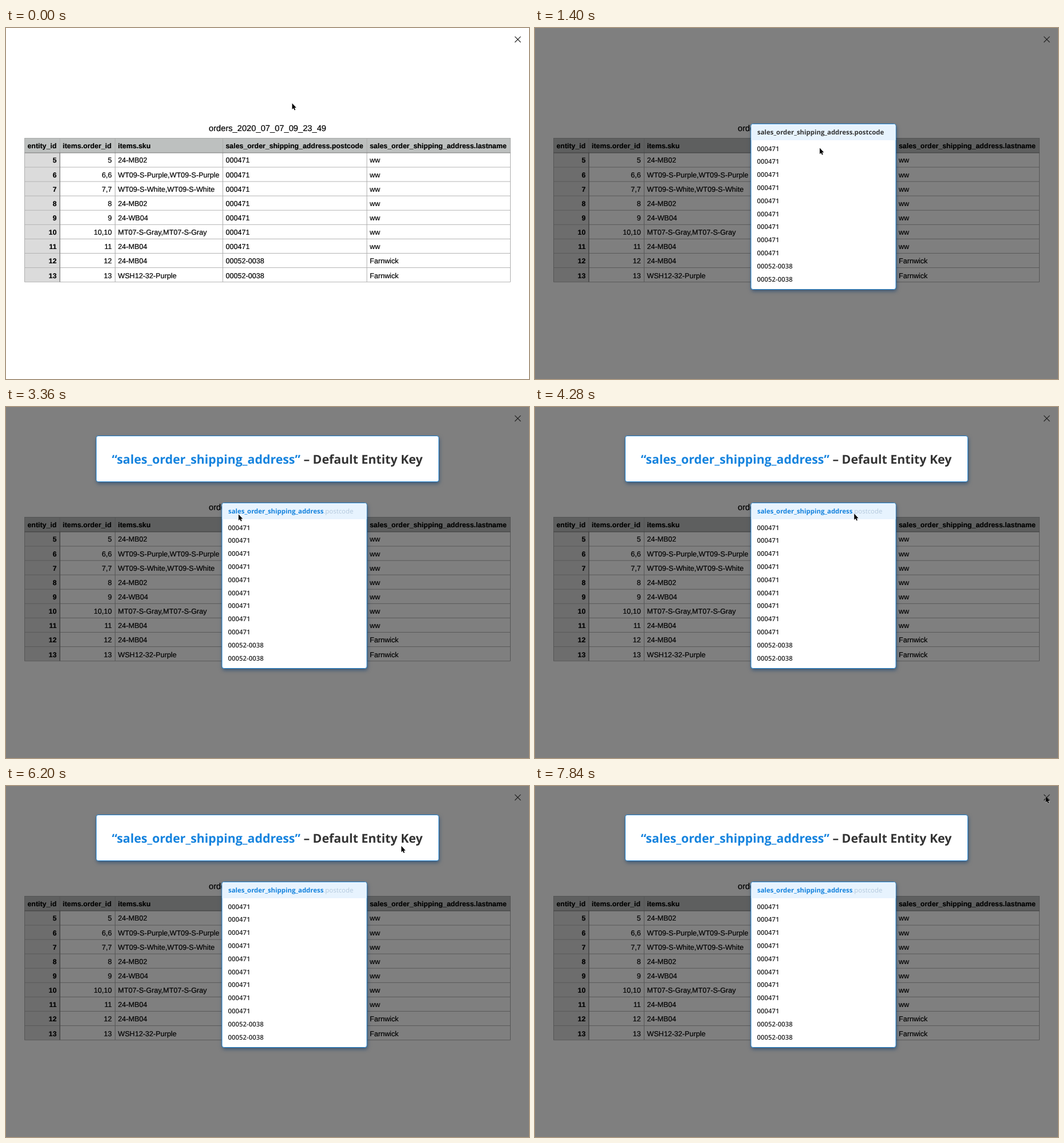
An HTML page for the animation above (8 s loop, 913 px wide and 613 px high).

```html
<!DOCTYPE html>
<html lang="en">
<head>
<meta charset="utf-8">
<title>Order export table</title>
<style>
  html, body { margin: 0; width: 100%; height: 100%; overflow: hidden; background: #fff; }
  svg { display: block; width: 913px; height: 613px; }
  text { text-rendering: geometricPrecision; white-space: pre; }
  #table { font: 12.6px "Liberation Sans", Arial, sans-serif; }
  #table text { stroke: #000; stroke-width: .2px; }
  #table .head { font-weight: bold; font-size: 12.35px; }
  #table .title { font-size: 14.7px; }
  #popup { font: 600 11.4px "Open Sans", sans-serif; fill: #222; }
  .bold { font-weight: 700; fill: #333; }
  .key { fill: #1583de; font-weight: 700; }
  .rest { fill: #b3c8dc; font-weight: 400; }
  .card { fill: #fff; stroke: #1c7fcd; filter: drop-shadow(1px 3px 3px rgba(0, 50, 105, .5)); }
</style>
</head>
<body>
<svg viewBox="0 0 913 613">
  <g id="table"></g>
  <g id="popup">
    <rect width="913" height="613" fill="#000" opacity=".5"/>
    <rect class="card" x="377" y="167.5" width="253" height="289" rx="3.5"/>
    <path d="M377.5 196V171q0-3 3-3H626.500q3 0 3 3V196z" fill="#e7f3fe"/>
    <text id="plain" class="bold" x="388" y="186">sales_order_shipping_address.postcode</text>
    <g id="banner">
      <text x="388" y="186"><tspan class="key">sales_order_shipping_address</tspan><tspan class="rest">.postcode</tspan></text>
      <rect class="card" x="157.500" y="50.500" width="598" height="80" rx="3.5"/>
      <text class="bold" x="456" y="98.500" font-size="21.3" text-anchor="middle"><tspan class="key">“sales_order_shipping_address”</tspan> – Default Entity Key</text>
    </g>
  </g>
  <path d="M888.300 14.800l10.200 10.200m0-10.200l-10.200 10.200" stroke="#222" stroke-width="1.1"/>
  <path id="cursor" d="M0-.6V10L2.400 7.900 4 11.600 5.700 10.900 4.200 7.300H7.300z" stroke="#fff" stroke-width=".8" paint-order="stroke"/>
</svg>
<script>
const $ = id => document.getElementById(id);
const table = $("table"), popup = $("popup"), banner = $("banner"), plain = $("plain"), cursor = $("cursor");

function add(parent, tag, attrs, content = "") {
  const el = document.createElementNS("http://www.w3.org/2000/svg", tag);
  for (const k in attrs) el.setAttribute(k, attrs[k]);
  el.textContent = content;
  parent.append(el);
}

// Table
const cols = [32.5, 94, 190.5, 378.5, 630, 880.5];
const top0 = 192, body0 = 218, rowH = 25.07, bottom = body0 + 9 * rowH;
const codes = ["000471", "00052-0038"];
const skus = ["24-MB02", "WT09-S-Purple,WT09-S-Purple", "WT09-S-White,WT09-S-White", "24-MB02",
  "24-WB04", "MT07-S-Gray,MT07-S-Gray", "24-MB04", "24-MB04", "WSH12-32-Purple"];

const fill = (x, y, w, h, color) => add(table, "rect", { x, y, width: w, height: h, fill: color });
const line = (d, color) => add(table, "path", { d, stroke: color, fill: "none" });
function cell(col, y, str, bold, right) {
  add(table, "text", {
    x: right ? cols[col + 1] - 5.7 : cols[col] + 5, y,
    class: bold ? "head" : "", "text-anchor": right ? "end" : "start"
  }, str);
}

fill(cols[0], body0, cols[1] - cols[0], bottom - body0, "#dbdbdb");
fill(cols[0], top0, cols[5] - cols[0], body0 - top0, "#bdc0bf");
for (let i = 1; i <= 9; i++) line(`M${cols[0]} ${body0 + i * rowH}H${cols[5]}`, "#b5b5b5");
for (const x of cols) line(`M${x} ${top0}V${bottom}`, "#adadad");
line(`M${cols[0]} ${top0 + .5}H${cols[5]}`, "#a8aaa9");
line(`M${cols[0]} ${body0}H${cols[5]}M${cols[1]} ${body0}V${bottom}`, "#777");

add(table, "text", { x: 456.5, y: 180, class: "title", "text-anchor": "middle" }, "orders_2020_07_07_09_23_49");
["entity_id", "items.order_id", "items.sku", "sales_order_shipping_address.postcode",
  "sales_order_shipping_address.lastname"].forEach((name, i) => cell(i, 210, name, true));
skus.forEach((sku, i) => {
  const y = 235.4 + i * 25.15, id = i + 5, late = i > 6;
  cell(0, y, id, true, true);
  cell(1, y, sku.includes(",") ? id + "," + id : id, false, true);
  cell(2, y, sku);
  cell(3, y, codes[+late]);
  cell(4, y, late ? "Farnwick" : "ww");
});

// Column popup
for (let i = 0; i < 11; i++) add(popup, "text", { x: 387.5, y: 214.6 + i * 22.8 }, codes[+(i > 8)]);

// Cursor path: time, x, y, horizontal speed at that point
const path = [
  [0, 499.5, 132], [480, 499.5, 132], [1120, 497, 210], [1680, 497, 210], [2280, 462.5, 192],
  [2480, 462.5, 192], [3160, 400.5, 188], [3280, 400.5, 188], [4000, 559.5, 187.5],
  [4240, 559.5, 187.5], [5090, 206, 105.5], [5920, 619, 105.5, .2], [6400, 717.5, 105.3],
  [6840, 717.5, 105.3], [7680, 890, 20.5], [7720, 890, 20.5], [7840, 891.5, 18.7], [8000, 891.5, 18.7]
];

function cursorAt(t) {
  const i = path.findIndex(p => p[0] > t);
  const [t0, x0, y0, v0 = 0] = path[i - 1], [t1, x1, y1, v1 = 0] = path[i];
  const d = t1 - t0, u = (t - t0) / d, s = u * u * (3 - 2 * u);
  const bend = d * u * (1 - u) * (v0 * (1 - u) - v1 * u);
  return [x0 + (x1 - x0) * s + bend, y0 + (y1 - y0) * s];
}

function draw(now) {
  const t = Math.floor(now % 8000 / 40) * 40;
  popup.style.display = t < 1400 ? "none" : "";
  banner.style.display = t < 2520 ? "none" : "";
  plain.style.display = t < 2520 ? "" : "none";
  cursor.setAttribute("transform", `translate(${cursorAt(t)})`);
}

const start = performance.now();
function tick() {
  draw(performance.now() - start);
  requestAnimationFrame(tick);
}
tick();
</script>
</body>
</html>
```
